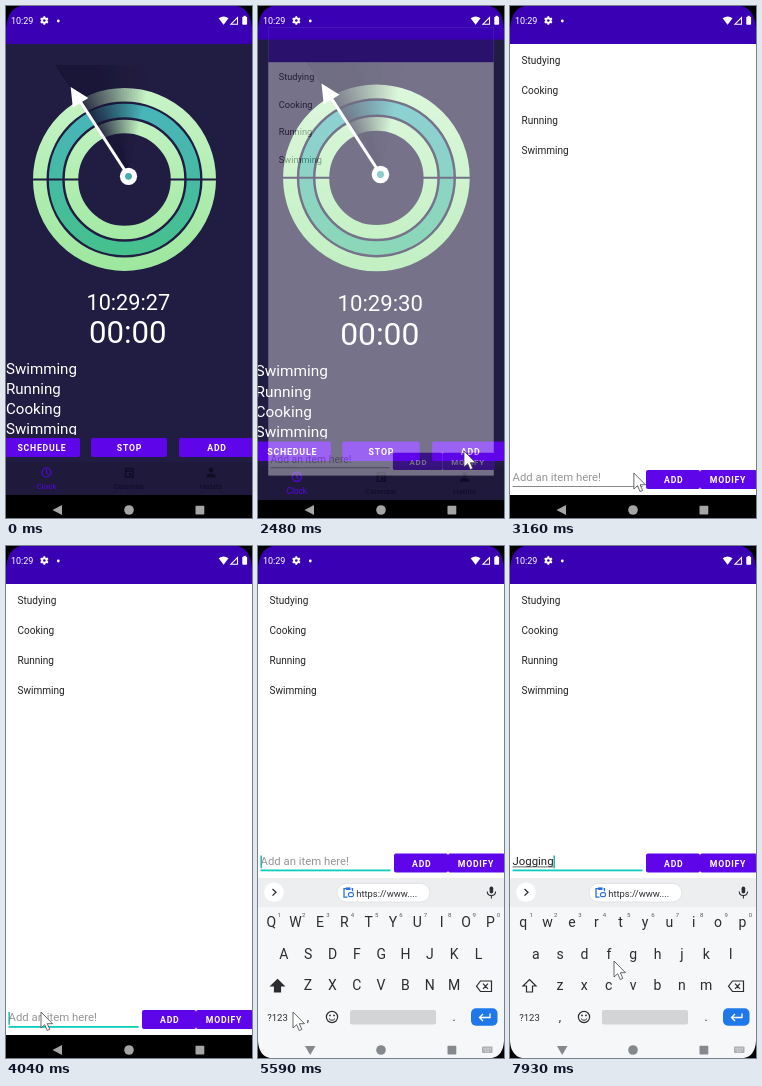
Recreate the animation shown at these times as an HTML page. Size 246 by 512 pixels, loop 8000 ms.

```html
<!DOCTYPE html>
<html lang="en">
<head>
<meta charset="utf-8">
<title>Activity timer</title>
<style>
html, body { margin: 0; width: 100%; height: 100%; overflow: hidden; background: #000; }
svg { display: block; width: 100vw; height: 100vh; font-family: Roboto, "Noto Sans", sans-serif; }
.btn { font-weight: 700; letter-spacing: .75px; text-anchor: middle; }
.mid { text-anchor: middle; }
</style>
</head>
<body>
<svg id="stage" viewBox="0 0 246 512" preserveAspectRatio="none"></svg>
<script>
const BG = '#211c42', BAR = '#3a00b3', BUTTON = '#5f05ea', TEAL = '#0bcdbb';

const text = (x, y, size, str, fill = '#fff', more = '') =>
  `<text x="${x}" y="${y}" font-size="${size}" fill="${fill}" ${more}>${str}</text>`;
const rect = (x, y, w, h, fill, r = 0, more = '') =>
  `<rect x="${x}" y="${y}" width="${w}" height="${h}" fill="${fill}" rx="${r}" ${more}/>`;
const circle = (x, y, r, fill, more = '') =>
  `<circle cx="${x}" cy="${y}" r="${r}" fill="${fill}" ${more}/>`;
const path = (d, fill, more = '') => `<path d="${d}" fill="${fill}" ${more}/>`;
const line = (d, stroke, w, more = '') =>
  path(d, 'none', `stroke="${stroke}" stroke-width="${w}" ${more}`);
const button = (x, y, w, label, cx) =>
  rect(x, y, w, 19, BUTTON, 2) + text(cx, y + 13.1, 8.7, label, '#fff', 'class="btn"');
const ring = (r, paint) =>
  circle(118.5, 173.5, r, 'none', `stroke="${paint}" stroke-width="13.5"`);
const rows = (list, x, y, step, size, fill) =>
  list.map((s, i) => text(x, y + i * step, size, s, fill)).join('');

// Nested wedges whose combined opacity rises linearly towards the hand.
function trail() {
  const hub = [122, 170], n = 24, first = -32.9, last = 12, peak = .88;
  const at = deg => {
    const a = deg * Math.PI / 180;
    return `${hub[0] + 140 * Math.sin(a)} ${hub[1] - 140 * Math.cos(a)}`;
  };
  let out = '';
  for (let i = 0; i < n; i++) {
    const end = last + (first - last) * i / n;
    out += path(`M${hub} L${at(first)} L${at(end)}Z`, '#1d1938', `opacity="${peak / (n - peak * i)}"`);
  }
  return `<g clip-path="url(#trailClip)">${out}</g>`;
}

function clockScreen() {
  const dim = '#100c26', active = '#5a05e6';
  return rect(-10, -10, 266, 499, BG) + rect(-10, -10, 266, 48, BAR) +
    ring(84.75, 'url(#lime)') + ring(68.9, 'url(#sea)') + ring(53, 'url(#lime)') +
    line('M26 173.5H74M163 173.5H212', BG, 2) + trail() +
    line('M122.5 170L72 92', '#fff', 3) + path('M64.7 81L82.3 92L66.8 101.7Z', '#fff') +
    circle(122.5, 170.3, 8.6, '#fff') + circle(122.5, 170.3, 3.4, '#3fb0ac') +
    text(122.3, 304, 21.7, '', '#fff', 'class="mid" id="time"') +
    text(121.8, 336.9, 31.2, '00:00', '#fff', 'class="mid"') +
    `<g clip-path="url(#listClip)">${rows(['Swimming', 'Running', 'Cooking', 'Swimming'], 0, 368, 20, 15.1, '#fff')}</g>` +
    button(-4, 432, 78, 'SCHEDULE', 36) + button(85, 432, 76, 'STOP', 123.4) +
    button(173, 432, 76, 'ADD', 211) +
    `<g clip-path="url(#addClip)">${circle(206, 445, 0, '#fff', 'id="ripple"')}</g>` +
    rect(-10, 456, 266, 33, '#1f1a3b') +
    circle(40.5, 466.5, 4.5, 'none', `stroke="${active}" stroke-width="1.2"`) +
    line('M40.5 463.5V467L42.5 468.5', active, 1) +
    line('M119.5 462.5H127V471H119.5ZM119.5 465H127', dim, 1.4) + rect(123, 467, 2.5, 2.5, dim) +
    circle(205, 464, 2.4, dim) + path('M200.3 471.5Q200.3 467.5 205 467.5T209.7 471.5Z', dim) +
    text(40.5, 483, 8, 'Clock', active, 'class="mid"') +
    text(123, 483, 7.8, 'Calendar', dim, 'class="mid"') +
    text(205, 483, 7.8, 'Habits', dim, 'class="mid"');
}

function editScreen() {
  return rect(0, 0, 246, 489, '#fff') + rect(0, 0, 246, 38, BAR) +
    rows(['Studying', 'Cooking', 'Running', 'Swimming'], 11.5, 57.9, 30, 10.05, '#222') +
    `<g id="form">${text(2.5, 475, 11.35, 'Add an item here!', '#969696', 'id="hint"')}
      ${text(2.5, 475, 11.4, '', '#222', 'id="typed"')}
      ${rect(2.5, 477, 0, .8, '#444', 0, 'id="compose"')}
      ${rect(2.5, 480, 130, 1, '#8a8a8a', 0, 'id="rule"')}
      ${rect(3, 466, 1.3, 12.8, '#07a99a', 0, 'id="caret"')}
      ${button(136, 464, 54, 'ADD', 163.8)}${button(190, 464, 57, 'MODIFY', 218)}</g>`;
}

function keyboard() {
  const ink = '#2b2d31';
  const keys = (row, x, y) => [...row].map((c, i) =>
    text(x + 24.35 * i, y, 14, c, ink, 'class="mid key"')).join('');
  const digits = [...'1234567890'].map((c, i) =>
    text(21.3 + 24.35 * i, 371.3, 6, c, '#55585c', 'class="mid"')).join('');
  return rect(0, 332, 246, 185, '#f6f7f8') + rect(0, 332, 246, 29, '#eceef0') +
    circle(16, 346.3, 9.8, '#fff') +
    `<g id="tools">${line('M14.5 343L18 346.3L14.5 349.6', ink, 1.3)}
      ${rect(231.6, 340.5, 3.6, 7, ink, 1.8)}
      ${line('M229.2 345.5Q229.5 349.6 233.4 349.6T237.6 345.5M233.4 349.6V352.5', ink, 1.1)}
    <g id="chip">${rect(-46.5, -9.3, 93, 18.6, '#fff', 9.3, 'stroke="#d8dadd" stroke-width=".7"')}
      ${line('M-36 -4H-39.5V4.5H-36M-32 -4H-31V-1.5', '#2a6fe0', 1.3)}
      ${rect(-37.5, -5.3, 4.5, 2.6, '#2a6fe0')}
      ${rect(-35, 0, 5, 4, 'none', 1.8, 'stroke="#2a6fe0" stroke-width="1.2"')}
      ${text(-27.2, 4, 9.4, 'https://www....', ink)}</g></g>` +
    keys('qwertyuiop', 13.2, 380.8) + digits + keys('asdfghjkl', 25.8, 412.5) + keys('zxcvbnm', 50, 444.4) +
    path('M19.5 433.5L26 440H22.5V446H16.5V440H13Z', 'none', `id="shift" stroke="${ink}" stroke-width="1.2"`) +
    line('M222.5 435H233.5V445.5H222.5L218.5 440.2ZM225 437.7L230 442.8M230 437.7L225 442.8', ink, 1.2) +
    text(19.5, 474.6, 9.5, '?123', ink, 'class="mid"') + text(50, 474.5, 12, ',', ink, 'class="mid"') +
    circle(74, 471, 5.6, 'none', `stroke="${ink}" stroke-width="1.2"`) +
    circle(72, 469.4, .9, ink) + circle(76, 469.4, .9, ink) + line('M71 472.6Q74 476 77 472.6', ink, 1) +
    rect(92, 464, 86, 14.6, '#d2d4d6', 2) + text(196, 474.5, 12, '.', ink, 'class="mid"') +
    rect(213, 462.3, 26.5, 17.4, '#1f78ea', 5) +
    line('M232 467.5V471.5H221.5M225 468L221.5 471.5L225 475', '#fff', 1.3);
}

function statusBar() {
  const teeth = line('M38.3 10.2V18.8M34.6 12.4L42 16.6M42 12.4L34.6 16.6', '#fff', 1.8);
  return text(5, 18, 9, '10:29') + teeth + circle(38.3, 14.5, 3.2, '#fff') + circle(38.3, 14.5, 1.3, BAR) +
    circle(52.3, 15, 1.4, '#fff') + path('M212.7 12.2Q217.6 8.8 222.5 12.2L217.6 18.7Z', '#fff') +
    line('M225 18.2L231.5 11.7V18.2Z', '#fff', 1.1) +
    rect(236.3, 10.8, 4.8, 8, '#fff', .8) + rect(237.6, 9.8, 2.2, 1.5, '#fff');
}

function corners() {
  return path('M0 0H15Q2 2 0 22ZM246 0H231Q244 2 246 22ZM0 512H12Q1 510 0 495ZM246 512H234Q245 510 246 495Z', '#000');
}

const stage = document.getElementById('stage');
stage.innerHTML = `<defs>
  <linearGradient id="lime" gradientUnits="userSpaceOnUse" x1="0" y1="82" x2="0" y2="265">
    <stop stop-color="#c9f4c8"/><stop offset="1" stop-color="#9ce79d"/></linearGradient>
  <linearGradient id="sea" gradientUnits="userSpaceOnUse" x1="0" y1="99" x2="0" y2="248">
    <stop stop-color="#48b4bb"/><stop offset="1" stop-color="#45c18c"/></linearGradient>
  <clipPath id="trailClip">${rect(0, 59, 246, 111, '#000')}</clipPath>
  <clipPath id="listClip">${rect(-10, 350, 266, 79, '#000')}</clipPath>
  <clipPath id="addClip">${rect(173, 432, 76, 19, '#000', 2)}</clipPath></defs>
  ${rect(0, 0, 246, 512, '#000')}
  <g id="clock">${clockScreen()}</g>
  <g id="edit">${editScreen()}</g>
  <g id="keys">${keyboard()}</g>
  ${rect(0, 489, 246, 23, '#000', 0, 'id="navShade"')}
  <g id="nav" fill="#a5a5a5">
    <path id="back"/><circle cx="123" cy="504" r="4.8"/><rect x="189.5" y="499.7" width="8.8" height="8.8" rx=".8"/></g>
  <g id="switcher">${rect(224, 500.5, 10.5, 6.5, '#a9acb0', 1)}
    ${line('M225.5 502.3H233M225.5 504H233M227 505.7H231.5', '#f1f2f4', .8, 'stroke-dasharray="1 .6"')}</g>
  ${statusBar()}${corners()}
  ${path('M0 0V16L3.7 12.7L6.2 18.5L8.8 17.4L6.3 11.7H11.5Z', '#fff', 'id="pointer" stroke="#444" stroke-width=".8"')}`;

const el = {};
stage.querySelectorAll('[id]').forEach(e => el[e.id] = e);
const keyCaps = [...stage.querySelectorAll('.key')].map(node => ({ node, char: node.textContent }));

const set = (id, attrs) => {
  for (const name in attrs) el[id].setAttribute(name, attrs[name]);
};
const show = (id, on) => set(id, { display: on ? 'inline' : 'none' });
const zoom = s => `translate(123 256) scale(${s}) translate(-123 -256)`;

// Linear interpolation through [time, value, ...] rows.
function track(steps, t, col = 1) {
  if (t <= steps[0][0]) return steps[0][col];
  for (let i = 1; i < steps.length; i++) {
    const a = steps[i - 1], b = steps[i];
    if (t < b[0]) return a[col] + (b[col] - a[col]) * (t - a[0]) / (b[0] - a[0]);
  }
  return steps[steps.length - 1][col];
}

const pointerPath = [[910, 222, 482], [1050, 214, 462], [1250, 207, 447], [1320, 206, 445], [2700, 206, 445],
  [2900, 180, 455], [3160, 124, 467], [3400, 90, 474], [3700, 50, 477], [3970, 35, 466], [7650, 35, 466], [7930, 104, 415]];
const rippleSize = [[1650, 8], [1790, 33], [1900, 44]];
const rippleFade = [[1650, .22], [1860, .22], [2140, 0]];
const oldZoom = [[2400, 1], [2480, 1.02], [2620, 1.045]];
const newZoom = [[2400, .86], [2480, .916], [2550, .965], [2620, .985], [2760, 1]];
const newFade = [[2400, 0], [2480, .37], [2550, .8], [2600, 1]];
const keysRise = [[4180, 45], [4320, 16], [4450, 5], [4590, 0]];
const keysFade = [[4180, .2], [4350, 1]];
const shadeFade = [[4180, 1], [4450, .12], [4590, 0]];
const chipZoom = [[4380, .4], [4450, .56], [4560, .9], [4660, 1]];
const toolsFade = [[4380, .2], [4450, .65], [4600, 1]];
const typing = [[5660, 'J'], [6130, 'Jo'], [6260, 'Jogg'], [6460, 'Joggi'], [6530, 'Joggin'], [6590, 'Jogging']];

function draw(t) {
  el.time.textContent = '10:29:' + (27 + [70, 1080, 2410].filter(s => t >= s).length);
  show('clock', t < 2800);
  set('clock', { transform: zoom(track(oldZoom, t)) });
  set('ripple', { r: t < 1650 ? 0 : track(rippleSize, t), opacity: track(rippleFade, t) });
  show('edit', t >= 2410);
  set('edit', { transform: zoom(track(newZoom, t)), opacity: track(newFade, t) });

  const focused = t >= 3900, raised = t >= 4180;
  const word = typing.reduce((s, [at, str]) => t >= at ? str : s, '');
  set('form', { transform: `translate(0 ${raised ? -156.5 : 0})` });
  set('rule', { fill: focused ? TEAL : '#8a8a8a', height: focused ? 1.8 : 1 });
  show('hint', !word);
  el.typed.textContent = word;
  const width = word ? el.typed.getComputedTextLength() : 0;
  set('compose', { width });
  set('caret', { x: 2.5 + width });
  show('caret', focused && !(t >= 4630 && t < 5130) && !(t >= 7320 && t < 7820));

  show('keys', raised);
  set('keys', { transform: `translate(0 ${track(keysRise, t)})`, opacity: track(keysFade, t) });
  set('tools', { opacity: track(toolsFade, t) });
  show('chip', t >= 4380);
  set('chip', { transform: `translate(125.5 346.7) scale(${track(chipZoom, t)})` });
  const caps = t >= 5590 && t < 5860;
  keyCaps.forEach(k => k.node.textContent = caps ? k.char.toUpperCase() : k.char);
  set('shift', { fill: caps ? '#2b2d31' : 'none' });
  show('navShade', raised);
  set('navShade', { opacity: track(shadeFade, t) });
  show('switcher', raised);
  set('nav', { fill: raised ? '#85888c' : '#a5a5a5' });
  set('back', { d: raised ? 'M47 500H57.5L52.2 509Z' : 'M56 499V509L46.5 504Z' });

  show('pointer', t >= 910);
  set('pointer', { transform: `translate(${track(pointerPath, t)} ${track(pointerPath, t, 2)})` });
}

const start = performance.now();
function tick() {
  draw((performance.now() - start) % 8000);
  requestAnimationFrame(tick);
}
tick();
</script>
</body>
</html>
```
